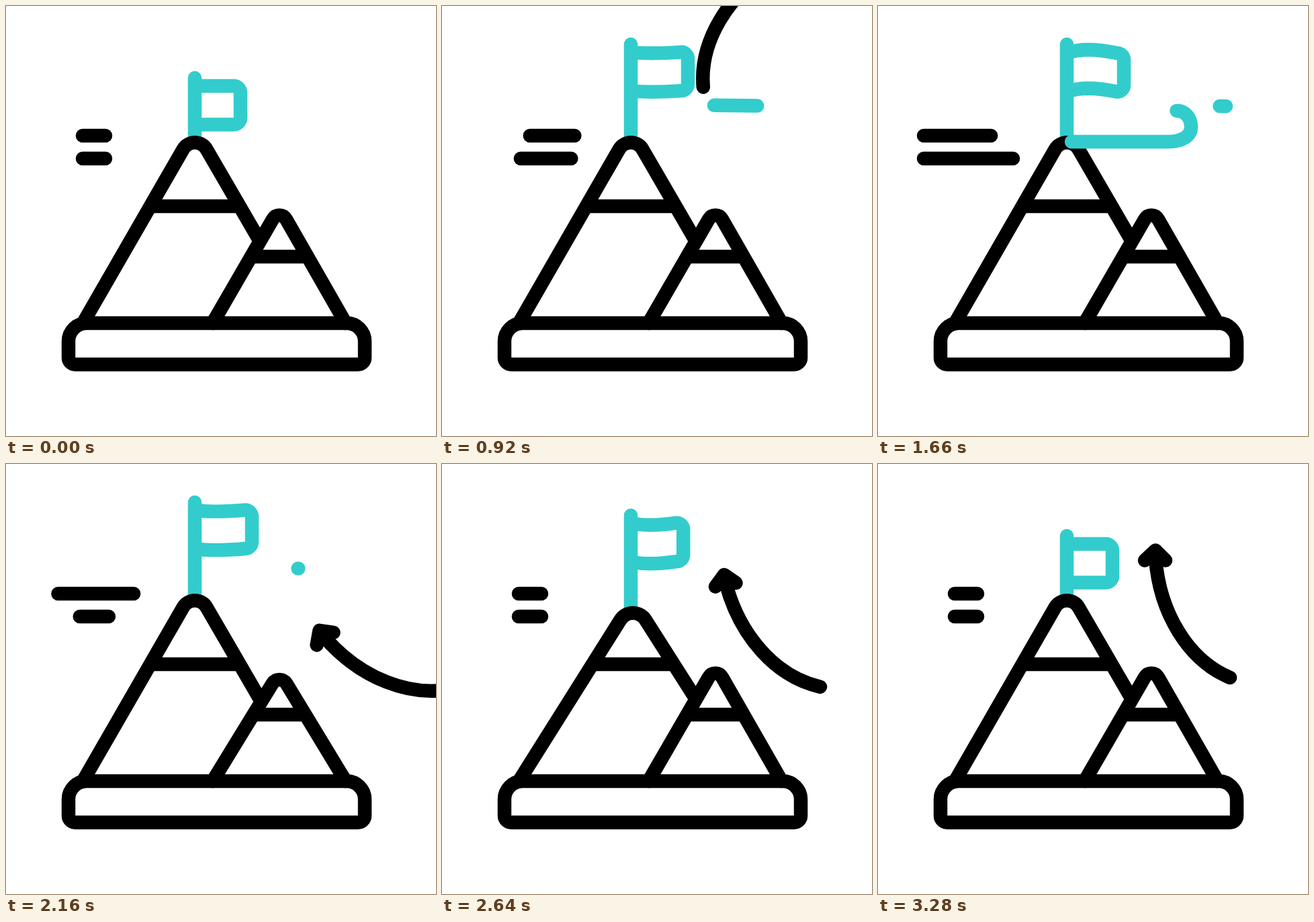
These frames come from a looping animation (640x640 px, 3500 ms). An HTML page:

```html
<!DOCTYPE html>
<html lang="en">
<head>
<meta charset="utf-8">
<title>Mountain flag</title>
<style>
  html, body { margin: 0; width: 100%; height: 100%; overflow: hidden; background: #fff; }
  svg { display: block; width: 100vw; height: 100vh; }
  path { fill: none; stroke: #000; stroke-width: 20.5; stroke-linecap: round; stroke-linejoin: round; }
  .teal { stroke: #33cccc; }
  .snow { stroke-linecap: butt; }
</style>
</head>
<body>
<svg viewBox="0 0 640 640">
  <path id="flag" class="teal"/>
  <path id="big"/>
  <path id="bigSnow" class="snow"/>
  <path id="small"/>
  <path id="smallSnow" class="snow"/>
  <path d="M120 472H507A27 27 0 0 1 534 499V523.5A10 10 0 0 1 524 533.5H103A10 10 0 0 1 93 523.5V499A27 27 0 0 1 120 472Z"/>
  <path id="speedTop"/>
  <path id="speedLow"/>
  <path id="gust" class="teal" d="M288 202H432C452 202 466 194 466 180C466 166 457 157 447 156L434.5 155.5"/>
  <path id="breeze" class="teal" d="M405 147.8L518 149.2"/>
  <path id="arrow" d="M524 318C462 292 419 222 413 140M397 143.5L413 128.5L428 143.5"/>
</svg>
<script>
const LOOP = 3500, STEP = 20, BEGIN = 240, END = 3280;
const el = id => document.getElementById(id);
const shape = (id, d) => el(id).setAttribute('d', d);
const progress = (t, from, to) => Math.min(1, Math.max(0, (t - from) / (to - from)));

// Smooth step from 0 to 1
function ease(t, from, to) {
  const u = progress(t, from, to);
  return u * u * (3 - 2 * u);
}

// One dip and one rebound
const bounce = (t, from, to, size) => size * Math.sin(2 * Math.PI * progress(t, from, to));

// Accelerates off the stage, then comes round and slows to rest
function spin(t) {
  const u = Math.max(0, t - BEGIN) / 1000, v = Math.max(0, END - t) / 1000;
  return Math.min(180 * u ** 2.75, 360 - v * v * (23 + 5 * v * v));
}

// Two legs from a peak, joined by a round cap of tangent length len
function mountain(id, left, right, peak, len, snowY) {
  const toward = p => {
    const dx = p[0] - peak[0], dy = p[1] - peak[1], d = Math.hypot(dx, dy);
    return [peak[0] + dx / d * len, peak[1] + dy / d * len];
  };
  const a = toward(left), b = toward(right);
  const half = Math.asin(Math.hypot(b[0] - a[0], b[1] - a[1]) / 2 / len);
  const r = len * Math.tan(half);
  const at = p => peak[0] + (p[0] - peak[0]) * (snowY - peak[1]) / (p[1] - peak[1]);
  shape(id, `M${left}L${a}A${r} ${r} 0 0 1 ${b}L${right}`);
  shape(id + 'Snow', `M${at(left)} ${snowY}H${at(right)}`);
}

// The flag rides on the big mountain and ripples while raised
function drawFlag(t, dip) {
  const rise = ease(t, BEGIN, 800);
  const top = 107 + dip - 50 * (rise - ease(t, 2960, END));
  const right = 349 + 17 * (rise - ease(t, 2380, 2980));
  const strength = 5.8 * ease(t, 560, 1500) * (1 - ease(t, 2700, END));
  const k = -strength * Math.cos(2 * Math.PI * (t - 1680) / 1500), e = -k * 0.2;
  const y1 = top + 12, y2 = y1 + 57.5, end = right - 10;
  const c1 = 281 + (end - 281) * 0.25, c2 = 281 + (end - 281) * 0.55;
  shape('flag',
    `M281 ${200 + dip}V${top}M281 ${y1 + e}C${c1} ${y1 + k} ${c2} ${y1 + k} ${end} ${y1 + e}` +
    `A10 10 0 0 1 ${right} ${y1 + e + 10}V${y2 + e - 10}A10 10 0 0 1 ${end} ${y2 + e}` +
    `C${c2} ${y2 + k} ${c1} ${y2 + k} 281 ${y2 + e}`);
}

// Both speed lines share one motion; the upper one starts later
function speedLine(id, y, t) {
  const out = ease(t, 0, 460), back = ease(t, 1530, 2010);
  const start = 114 + 17 * out - 63 * ease(t, 460, 1180) + 46 * back;
  const end = 148 + 50 * out - 30 * ease(t, 500, 1150) + 33 * ease(t, 1160, 1420) - 53 * back;
  shape(id, `M${start} ${y}H${end}`);
}

function trim(id, from, to) {
  const path = el(id), len = path.getTotalLength();
  path.style.visibility = to - from > 0.0001 ? 'visible' : 'hidden';
  path.style.strokeDasharray = `${(to - from) * len} 9999`;
  path.style.strokeDashoffset = -from * len;
}

function draw(t) {
  const big = bounce(t, 2380, END, 20), small = bounce(t, 1960, 2560, 11.2);
  drawFlag(t, big);
  mountain('big', [114.5, 472], [377, 348.5], [281 + big * 0.16, 183 + big], 35, 298);
  mountain('small', [307.5, 472], [505.5, 472], [407, 300 + small], 20, 373);
  speedLine('speedLow', 227, t - BEGIN);
  speedLine('speedTop', 193, t - BEGIN - 250);
  trim('gust', ease(t, 1660, 2180), ease(t, 1240, 1720));
  trim('breeze', ease(t, 1200, 1760), ease(t, 800, 1020));
  el('arrow').setAttribute('transform', `rotate(${spin(t)} 619.5 107.6)`);
}

const begun = performance.now();
function tick() {
  const t = (performance.now() - begun) % LOOP;
  draw(Math.floor(t / STEP) * STEP);
  requestAnimationFrame(tick);
}
tick();
</script>
</body>
</html>
```
